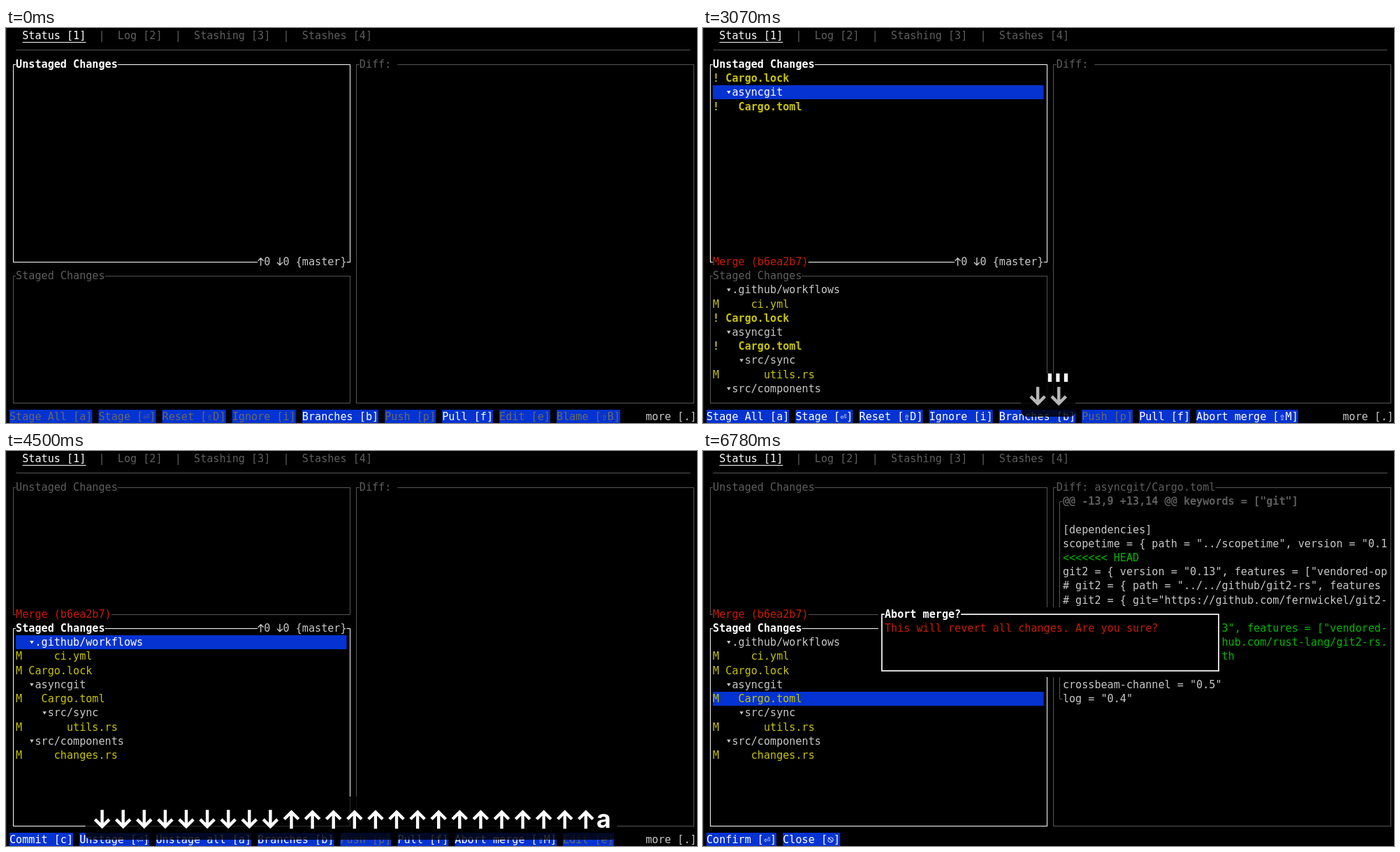
An HTML page with a canvas that plays this animation: 989x566 px, repeating every 8 s.

```html
<!DOCTYPE html>
<html lang="en">
<head>
<meta charset="utf-8">
<title>Terminal git client</title>
<style>
html, body { margin: 0; width: 100%; height: 100%; overflow: hidden; background: #000; }
canvas { display: block; }
</style>
</head>
<body>
<canvas id="stage" width="989" height="566"></canvas>
<script>
const ctx = document.getElementById('stage').getContext('2d');
const LOOP = 8000, CW = 9.105, RH = 20.22, LAST_ROW = 27;
const MONO = '15.12px "DejaVu Sans Mono", "Noto Sans Mono", monospace';
const KEY_FONT = '700 36px Inter, "Open Sans", sans-serif';
const C = {
  text: '#c7c7c7', white: '#fff', dim: '#5e5e5e', line: '#555', blue: '#0433d1',
  red: '#c91b00', green: '#00b800', yellow: '#c7c400', magenta: '#ca30c7', thick: '#d8d8d8'
};

// Terminal cells to pixels: left edge of a column, centre of a row
const X = col => 5 + col * CW;
const Y = row => 11.2 + row * RH;
// Centre of a line that covers whole pixels
const snap = (v, width) => Math.round(v + 0.5 - width / 2) + width / 2;

function fillCells(col, row, cols, rows, color) {
  ctx.fillStyle = color;
  const top = Math.ceil(Y(row) - RH / 2 - 0.1), bottom = Math.floor(Y(row + rows - 1) + RH / 2);
  ctx.fillRect(X(col), top, cols * CW, bottom - top);
}

// Arrow centred on x, y; angle 0 points down
function arrow(x, y, angle, length, head, width, color) {
  const tip = length / 2 - width * 0.7;
  ctx.save();
  ctx.translate(x, y);
  ctx.rotate(angle);
  ctx.lineWidth = width;
  ctx.strokeStyle = color;
  ctx.beginPath();
  ctx.moveTo(0, -length / 2);
  ctx.lineTo(0, tip);
  ctx.moveTo(-head, tip - head);
  ctx.lineTo(0, tip);
  ctx.lineTo(head, tip - head);
  ctx.stroke();
  ctx.restore();
}

const ANGLES = { '↓': 0, '↑': Math.PI };
const isArrow = ch => ch in ANGLES;

function print(text, col, row, color = C.text, bold = false) {
  ctx.font = (bold ? 'bold ' : '') + MONO;
  ctx.fillStyle = color;
  [...text].forEach((ch, i) => {
    const x = X(col + i), y = Y(row);
    if (ch === '▾') {
      ctx.beginPath();
      ctx.moveTo(x + 1.8, y - 2);
      ctx.lineTo(x + 7.4, y - 2);
      ctx.lineTo(x + 4.6, y + 2.5);
      ctx.fill();
    } else if (isArrow(ch)) arrow(x + CW / 2, y, ANGLES[ch], 12, 4, 1.4, color);
    else if (ch === '⟶') arrow(x + CW, y, -Math.PI / 2, 17, 4, 1.4, color);
    else if (ch !== ' ') ctx.fillText(ch, x, y + 5.2);
  });
}

function stroke(points, color, width = 1) {
  ctx.strokeStyle = color;
  ctx.lineWidth = width;
  ctx.beginPath();
  points.forEach(([x, y]) => ctx.lineTo(snap(x, width), snap(y, width)));
  ctx.stroke();
}

function underline(text, col, row) {
  print(text, col, row, C.white);
  stroke([[X(col), Y(row) + 9], [X(col + text.length), Y(row) + 9]], C.white);
}

function box(c0, r0, c1, r1, color, width) {
  const l = snap(X(c0 + 0.5), width), r = snap(X(c1 + 0.5), width);
  const t = snap(Y(r0), width), b = snap(Y(r1), width);
  ctx.strokeStyle = color;
  ctx.lineWidth = width;
  ctx.strokeRect(l, t, r - l, b - t);
}

// Text that interrupts a border line
function label(text, col, row, color, bold) {
  fillCells(col, row, text.length, 1, '#000');
  print(text, col, row, color, bold);
}

function popup(c0, r0, c1, r1, title, color, bold) {
  fillCells(c0, r0, c1 - c0 + 1, r1 - r0 + 1, '#000');
  box(c0, r0, c1, r1, C.thick, 2);
  label(title, c0 + 1, r0, color, bold);
}

// Trees of changed files and the path behind each line
const WORK = ['! Cargo.lock', '  ▾asyncgit', '!   Cargo.toml'];
const WORK_PATHS = ['Cargo.lock', '', 'asyncgit/Cargo.toml'];
const INDEX = ['  ▾.github/workflows', 'M     ci.yml', '! Cargo.lock', '  ▾asyncgit', '!   Cargo.toml',
  '    ▾src/sync', 'M       utils.rs', '  ▾src/components', 'M     changes.rs'];
const INDEX_PATHS = ['', '.github/workflows/ci.yml', 'Cargo.lock', '', 'asyncgit/Cargo.toml',
  '', 'asyncgit/src/sync/utils.rs', '', 'src/components/changes.rs'];

// First character of a diff line: @ hunk, + added, - removed
const UTILS_DIFF = `@@@ -173,7 +173,13 @@ pub(crate) fn repo_write_file(
     file: &str,
     content: &str,
 ) ⟶  Result<()> {
-    let dir = work_dir(repo)?.join(file);
+    let dir = work_dir(repo)?;
+
+    //Note: only canonicalize on windows to support
+    #[cfg(windows)]
+    let dir = dir.canonicalize()?;
+
+    let dir = dir.join(file);
     let file_path = dir.to_str().ok_or_else(|| {
         Error::Generic(String::from("invalid file p
     })?;
@@@ -384,3 +390,104 @@ mod tests {
         Ok(())
     }
 }
+
+#[cfg(test)]
+mod test_long_paths {
+    use std::{fs::create_dir_all, path::Path};`.split('\n');
const CARGO_DIFF = `@@@ -13,9 +13,14 @@ keywords = ["git"]
 
 [dependencies]
 scopetime = { path = "../scopetime", version = "0.1
+<<<<<<< HEAD
 git2 = { version = "0.13", features = ["vendored-op
 # git2 = { path = "../../github/git2-rs", features
 # git2 = { git="https://github.com/fernwickel/git2-
+=======
+# git2 = { version = "0.13", features = ["vendored-
+git2 = { git="https://github.com/rust-lang/git2-rs.
+>>>>>>> fix-176-win-maxpath
 rayon-core = "1.9"
 crossbeam-channel = "0.5"
 log = "0.4"`.split('\n');

const BRANCHES = [
  ['', 'CopperLark88-commit-len', 'aa39206', 'Fix rustfmt'],
  ['', 'CopperLark88-multi-line-commit', '424c4ce', 'Fix build'],
  [' ↑', 'fix-176-win-maxpath', 'b6ea2b7', 'put long filename into subfolder'],
  ['*↑', 'master', 'ca808ca', 'update state after merge (#703)']
];

// Timeline: each step changes part of the state
const down = n => '↓'.repeat(n), up = n => down(9) + '↑'.repeat(n);
const STEPS = [
  [0, { view: 'status', focus: 0, sel: 0, branch: 2, merge: false, staged: false, keys: '' }],
  [710, { keys: 'b' }], [780, { view: 'branches' }],
  [1280, { keys: '↑' }], [1350, { branch: 1 }], [1490, { keys: '↑↓' }], [1570, { branch: 2 }],
  [2140, { keys: 'm' }], [2210, { view: 'status', merge: true }],
  [2920, { keys: down(1) }], [3000, { keys: down(2), sel: 1 }], [3140, { keys: down(3), sel: 2 }],
  [3210, { focus: 1, sel: 0 }], [3280, { keys: down(4), sel: 1 }],
  [3350, { keys: down(5), sel: 2 }], [3420, { keys: down(6), sel: 3 }],
  [3570, { keys: down(7), sel: 4 }], [3710, { keys: down(8), sel: 5 }],
  [3850, { keys: down(9) }], [3920, { sel: 6 }],
  [4000, { keys: up(3), sel: 4 }], [4070, { keys: up(7), sel: 1 }],
  [4140, { keys: up(11), focus: 0, sel: 1 }], [4210, { keys: up(15), sel: 0 }],
  [4420, { keys: up(15) + 'a', staged: true, focus: 1 }],
  [4640, { keys: up(15) + 'a↓', sel: 1 }],
  [5070, { keys: down(1), sel: 2 }], [5210, { keys: down(2), sel: 3 }], [5280, { keys: down(3), sel: 4 }],
  [5920, { keys: 'M' }], [5990, { view: 'abort' }],
  [6570, { keys: '' }]
];
const KEY_GROUPS = [0, 710, 1280, 2140, 2920, 5070, 5920, 6570];
const FADE = 210;

const stateAt = t => Object.assign({}, ...STEPS.filter(s => s[0] <= t).map(s => s[1]));

function drawTree(lines, row, rows, sel) {
  lines.slice(0, rows).forEach((line, i) => {
    if (i === sel) fillCells(1, row + i, 52, 1, C.blue);
    const folder = line.includes('▾');
    print(line, 1, row + i, folder ? (i === sel ? C.white : C.text) : C.yellow, line[0] === '!');
  });
}

function drawDiff(lines) {
  const x = X(55.5);
  lines.forEach((line, i) => {
    const row = 3 + i, kind = line[0];
    const color = { '@': C.dim, '+': C.green, '-': C.red }[kind] || C.text;
    print(line.slice(1, 52), 56, row, color, kind === '@');
    if (kind !== '@') return;
    const next = lines.findIndex((l, j) => j > i && l[0] === '@');
    const end = next > 0 ? next - 1 : lines.length - 1;
    const open = end + 3 === 25;
    const rail = [[x + 4, Y(row)], [x, Y(row)], [x, Y(end + 3) + (open ? RH / 2 : 0)]];
    if (!open) rail.push([x + 4, Y(end + 3)]);
    stroke(rail, C.line);
  });
}

function drawStatus(s) {
  underline('Status [1]', 2, 0);
  print('|  Log [2]  |  Stashing [3]  |  Stashes [4]', 14, 0, C.dim);
  stroke([[X(1), Y(1)], [X(107), Y(1)]], C.line);

  const split = s.focus ? 11 : 16;
  const edge = on => on ? C.white : C.line;
  const title = on => on ? C.white : C.dim;
  box(0, 2, 53, split, edge(!s.focus), 1);
  label('Unstaged Changes', 1, 2, title(!s.focus), !s.focus);
  box(0, split + 1, 53, 26, edge(s.focus), 1);
  label('Staged Changes', 1, split + 1, title(s.focus), !!s.focus);
  label('↑0 ↓0 {master}', 39, s.focus ? 12 : 16, C.text);

  let path = '';
  if (s.merge) {
    label('Merge (b6ea2b7)', 1, split, C.red);
    const index = s.staged ? INDEX.map(l => l.replace('!', 'M')) : INDEX;
    if (!s.staged) drawTree(WORK, 3, 8, s.focus ? -1 : s.sel);
    drawTree(index, split + 2, 24 - split, s.focus ? s.sel : -1);
    path = (s.focus ? INDEX_PATHS : WORK_PATHS)[s.sel];
  }
  box(54, 2, 107, 26, C.line, 1);
  label('Diff: ' + path, 55, 2, C.dim);
  if (path.endsWith('utils.rs')) drawDiff(UTILS_DIFF);
  if (path.endsWith('.toml') && s.staged) drawDiff(CARGO_DIFF);
  return path;
}

function drawBranches(s) {
  popup(10, 4, 95, 23, 'Branches', C.text);
  underline('Local', 12, 5);
  print('|  Remote', 19, 5, C.dim);
  stroke([[X(11), Y(6)], [X(95), Y(6)]], C.line);
  BRANCHES.forEach(([mark, name, hash, message], i) => {
    const row = 7 + i, on = i === s.branch, head = name === 'master';
    if (on) fillCells(11, row, 45 + message.length, 1, C.blue);
    print(mark, 11, row, C.green);
    print(name, 14, row, head ? C.white : C.text, head);
    print(hash, 48, row, C.magenta);
    print(message, 56, row, on ? C.white : C.text);
  });
}

// A leading "-" marks a disabled command
function drawCommands(list, more) {
  let col = 0;
  for (const item of list.split(',')) {
    const off = item[0] === '-', text = off ? item.slice(1) : item;
    fillCells(col, LAST_ROW, text.length, 1, C.blue);
    print(text, col, LAST_ROW, off ? '#686868' : C.white);
    col += text.length + 1;
  }
  if (more) print('more [.]', 100, LAST_ROW);
}

function commands(s, path) {
  if (s.view === 'branches') return 'Scroll [↑↓],Close [⎋],Remote [⇥],Checkout [⏎],Create [c],Delete [⇧D],Merge [m],Rename Branch [r]';
  if (s.view === 'abort') return 'Confirm [⏎],Close [⎋]';
  if (!s.merge) return '-Stage All [a],-Stage [⏎],-Reset [⇧D],-Ignore [i],Branches [b],-Push [p],Pull [f],-Edit [e],-Blame [⇧B]';
  const tail = 'Branches [b],-Push [p],Pull [f],Abort merge [⇧M]';
  if (!s.focus) return 'Stage All [a],Stage [⏎],Reset [⇧D],Ignore [i],' + tail;
  return 'Commit [c],Unstage [⏎],Unstage all [a],' + tail + (path ? ',Edit [e]' : ',-Edit [e]');
}

const keyWidth = ch => isArrow(ch) ? 30.1 : ctx.measureText(ch).width;
const keysWidth = keys => [...keys].reduce((sum, ch) => sum + keyWidth(ch), 0);

function drawKeys(keys, x, dy) {
  ctx.fillStyle = C.white;
  for (const ch of keys) {
    const w = keyWidth(ch);
    if (isArrow(ch)) arrow(x + w / 2, 527.7 + dy, ANGLES[ch], 27, 10.2, 4.4, C.white);
    else ctx.fillText(ch, x, 539.5 + dy);
    x += w;
  }
}

// Keystroke panel: a new group fades in while the last one slides up and out
function drawPanel(s, t) {
  const born = KEY_GROUPS.filter(g => g <= t).pop();
  const old = born ? stateAt(born - 1).keys : '';
  const p = Math.min(1, (t - born) / FADE);
  if (!s.keys && (!old || p === 1)) return;
  ctx.save();
  ctx.font = KEY_FONT;
  const w = keysWidth(s.keys || old), left = 494.2 - w / 2;
  ctx.beginPath();
  ctx.roundRect(left - 9, 495, w + 18, 62, 8);
  ctx.clip();
  ctx.globalAlpha = s.keys ? (old ? 1 : p) : 1 - p;
  ctx.fillStyle = 'rgba(0,0,0,.82)';
  ctx.fill();
  if (p < 1) drawKeys(old, left + w - keysWidth(old), -45 * p);
  ctx.globalAlpha = p;
  drawKeys(s.keys, left, 0);
  ctx.restore();
}

function draw(t) {
  const s = stateAt(t);
  ctx.fillStyle = '#000';
  ctx.fillRect(0, 0, 989, 566);
  ctx.fillStyle = '#222';
  ctx.fillRect(0, 0, 1, 566);
  const path = drawStatus(s);
  if (s.view === 'branches') drawBranches(s);
  if (s.view === 'abort') {
    popup(27, 11, 80, 15, 'Abort merge?', C.white, true);
    print('This will revert all changes. Are you sure?', 28, 12, C.red);
  }
  drawCommands(commands(s, path), s.view === 'status');
  drawPanel(s, t);
}

const start = performance.now();
function tick() {
  draw((performance.now() - start) % LOOP);
  requestAnimationFrame(tick);
}
tick();
</script>
</body>
</html>
```
